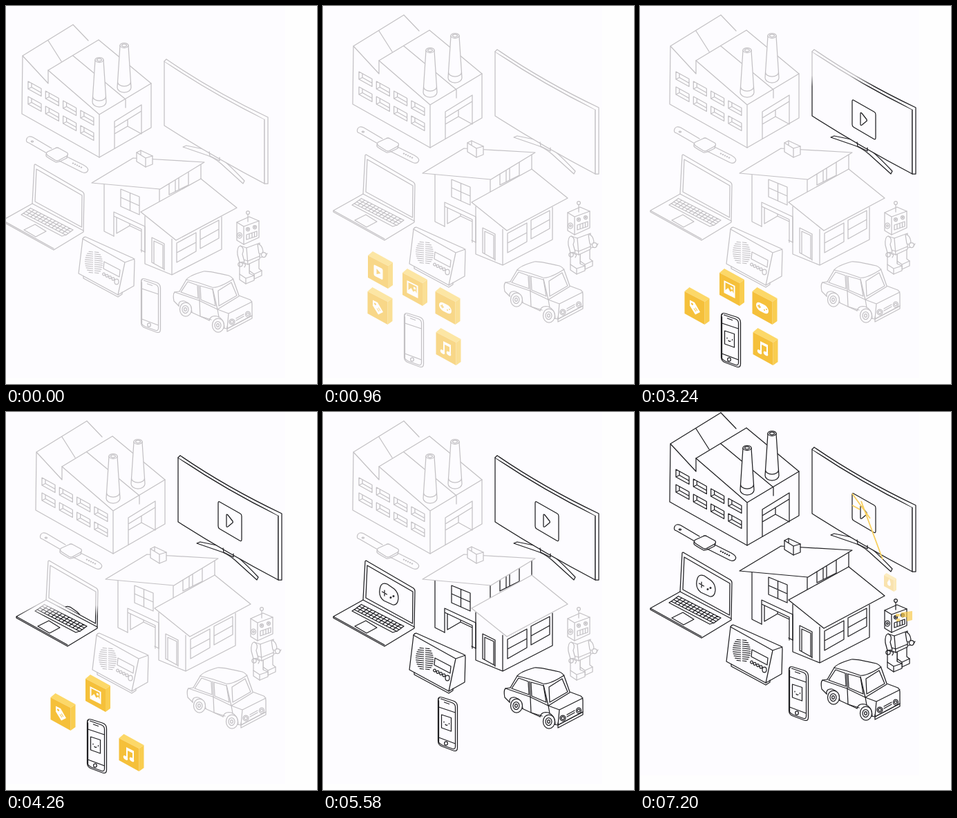
Animation of 450x547 px, one loop 7.26 s. Source, as an HTML page:

```html
<!DOCTYPE html>
<html lang="en">
<head>
<meta charset="utf-8">
<title>Connected things</title>
<style>
html, body { margin: 0; width: 100%; height: 100%; overflow: hidden; background: #fefefe; }
svg { display: block; width: 450px; height: 547px; }
.thing { fill: none; stroke-width: 1.25; stroke-linejoin: round; stroke-linecap: round; }
.solid { fill: #fdfcff; }
</style>
</head>
<body>
<svg id="stage" viewBox="0 0 450 547"></svg>
<script>
const NS = 'http://www.w3.org/2000/svg';
const LOOP = 7260, STEP = 60;
const GRAY = '#c3c1c4', DARK = '#1f1f22';
const stage = document.getElementById('stage');

function el(tag, attrs, parent) {
  const node = document.createElementNS(NS, tag);
  for (const key in attrs) node.setAttribute(key, attrs[key]);
  parent.appendChild(node);
  return node;
}
const range = n => [...Array(n).keys()];
const ring = (x, y, rx, ry = rx) =>
  `M${x - rx},${y}a${rx},${ry} 0 1 0 ${2 * rx},0a${rx},${ry} 0 1 0 ${-2 * rx},0z`;
const clamp = u => Math.min(1, Math.max(0, u));
const linear = (t, a, b) => clamp((t - a) / (b - a));
const ease = (t, a, b) => { const u = linear(t, a, b); return u * u * (3 - 2 * u); };
const move = (node, x, y, s = 1) => node.setAttribute('transform', `translate(${x},${y}) scale(${s})`);

const defs = el('defs', {}, stage);
const panel = el('rect', { y: -20, width: 404, height: 558, class: 'solid' }, stage);
const scene = el('g', {}, stage);
const wipes = [];

// A line drawing whose colour turns dark from bottom to top.
// Paths that start with "#" hide what lies behind them.
function thing(id, [bottom, top], [from, to], paths, parent = scene) {
  const grad = el('linearGradient', { id: 'ink-' + id, gradientUnits: 'userSpaceOnUse', x1: 0, x2: 0 }, defs);
  el('stop', { offset: 0, 'stop-color': GRAY }, grad);
  el('stop', { offset: 1, 'stop-color': DARK }, grad);
  const g = el('g', { class: 'thing', stroke: `url(#ink-${id})` }, parent);
  for (const p of paths) {
    const solid = p[0] === '#';
    el('path', { d: solid ? p.slice(1) : p, class: solid ? 'solid' : '' }, g);
  }
  wipes.push({ grad, bottom, top, from, to });
  return g;
}

function clip(id, d) {
  el('path', { d }, el('clipPath', { id }, defs));
}

// Factory
const factoryWindow = (x, y) =>
  `M${x},${y}l19,10.5v11l-19,-10.5zm5,3v5.5l14,8m-14,-8l-5,2.5`;
const chimney = (x, y) => [
  `#M${x - 6},${y}L${x - 10},${y + 61}a10,7 0 0 0 20,0L${x + 6},${y}z`,
  `M${x - 9.5},${y + 53}a9.5,6 0 0 0 19,0`,
  '#' + ring(x, y, 6, 3.5), ring(x, y, 3.5, 1.8)
];
thing('factory', [206, 8], [5760, 6400], [
  'M44,58L117,13L139,36M81,36L100,66M44,58L81,98V79L154,35L230,98V162L155,205L43,142L44,58',
  'M81,79L155,143V205M155,143L230,98M117,58L193,121V133',
  'M177,192V153L216,129V171M177,162L216,138M177,171L196,160L216,171M196,151V160',
  range(8).map(i => factoryWindow(52 + 25.3 * (i % 4), 95 + 14 * (i % 4) + 22 * (i >> 2))).join(''),
  ...chimney(191, 43), ...chimney(155, 64)
]);

// Television
thing('tv', [245, 60], [2640, 3480], [
  '#M276,190L281,188L315,195Q331,203 365,239L363,243L331,214Q319,204 308,201z',
  '#M249,66Q316,111.500 394,150V243Q318,203 249,159z',
  '#M249,66L252,63Q319,109 399,147V243H394V150',
  'M314,197L315,203L329,210V205'
]);
const playIcon = thing('play', [240, 60], [2640, 3000], [
  'M309,130L339,147Q341,148 341,151V184Q341,188 338,186L309,169Q307,168 307,165V132Q307,129 309,130z',
  'M319,149Q319,147 321,149L328,158Q329,160 327,161L321,166Q319,167 319,165z'
]);

// Watch
thing('watch', [228, 172], [5640, 6080], [
  'M86,192L59,176Q52,173 50,178T53,184L79,199M108,204L132,216Q141,221 138,225T129,226L97,210',
  '#M80,197L91,192Q94,190 97,192L108,198Q111,200 108,203L97,209Q94,211 91,209L80,202Q77,199 80,197z',
  'M78,200V203Q79,205 92,212Q95,213 108,206L109,202',
  ring(58, 182, 1.6, 1),
  range(5).map(i => ring(117 + 3 * i, 213.5 + 1.5 * i, .7, .5)).join('')
]);

// Laptop
const keyboard = range(4).map(i => {
  const x = 55.5 - 3.4 * i, y = 278.5 + 2.5 * i;
  return `M${x},${y}l61.5,31.5`;
}).join('') + range(13).map(i => {
  const x = 55.5 + 5.12 * i, y = 278.5 + 2.62 * i;
  return `M${x},${y}l-10.2,7.5`;
}).join('') + 'M45,286L42,288L101,319L107,317';
thing('laptop', [340, 214], [3900, 4740], [
  'M58,272L61,216Q62,214 64,216L131,255Q133,257 133,259L132,311z',
  'M64,222L130,260L129.5,306L62,269z',
  'M58,272L15,296V298L89,339L132,313V311M15,296L89,337',
  keyboard,
  'M62,302L78,312L63,320L46,310z'
]);
clip('laptop-screen', 'M64,222L130,260L129.5,306L62,269z');
const padIcon = thing('pad', [340, 214], [3900, 4100], [
  'M83,253Q85,246 93,249L103,256Q109,261 109,270Q108,280 101,279L88,273Q79,266 83,253z',
  'M89,258V266M85.5,260L92.5,264', ring(98, 268.5, .9), ring(102, 266.5, .9)
], el('g', { 'clip-path': 'url(#laptop-screen)' }, scene));

// House
thing('house', [376, 214], [4760, 5580], [
  'M162,244V312L176,319M221,342L215,339M242,251V269M302,215V238',
  'M176,319V284L221,305V342M176,290L216,309V342M180,292V315L199,304L216,312M199,301V304',
  'M186,251L213,262V288L186,276zM199.5,257V282M186,263L213,275',
  'M256,243V259L284,245V226M265,238V254M270,235V252',
  'M221,290V359L260,375L332,338V291M260,323V375',
  'M231,357V321L249,330V368M234,358V326L247,332V365M231,357L249,367',
  'M267,329L295,314V341L267,357zM267,343L295,328M301,310L328,296V322L301,337zM301,324L328,309'
]);
thing('roof', [326, 194], [5590, 5960], [
  '#M144,242L204,206L307,212L243,251z',
  '#M209,198L215,195L232,203V215L222,219L209,211z',
  'M209,198L222,206V219M222,206L232,203M215,195V201',
  '#M215,284L302,236L354,278L266,325z'
]);

// Radio
const slots = range(11).map(i => {
  const w = 12.5 * Math.sqrt(1 - ((i - 5) / 6) ** 2), y = 342 + 3 * i;
  return `M${147 - w},${y - w * .1}L145.5,${y}M148.5,${y}L${147 + w},${y + w * .1}`;
}).join('');
thing('radio', [408, 318], [4380, 4860], [
  '#M131,323Q132,320 135,320L204,351Q206,352 206,355L205,391L182,404L125,373z',
  'M131,323L192,357L182,404M192,357L206,352', 'M132,377V380L182,407L188,403V400',
  slots, 'M162,356L185,368L184,378L161,366z',
  range(4).map(i => ring(161.5 + 4.5 * i, 374 + 2.3 * i, 1.8, 2)).join(''), ring(180, 385, 3, 3.8)
]);

// Car
const wheel = (x, y) => ['#' + ring(x, y, 8.5, 10), ring(x - .5, y, 4.5, 5.5), ring(x - .5, y, 1.8, 2.4)];
thing('car', [461, 368], [4980, 5520], [
  'M271,399L281,382Q285,376 306,370Q312,369 342,376Q348,378 350,385L357,405L373,411Q376,413 376,418L376,434L340,453L334,452',
  'M271,399L264,400Q261,403 263,413L270,420M288,429L314,441',
  'M281,382Q300,386 318,393Q327,395 349,381',
  'M264,400L299,412L326,425L357,406M326,425L342,431L376,414M342,431L340,453',
  'M283,385L297,390L298,409L273,400zM301,391L319,396L323,420L302,411z',
  'M327,398L346,386L354,405L328,420zM299,390L301,435L317,440M319,395L326,425L328,436',
  'M270,420Q269,412 278,413Q288,416 289,429M314,441Q316,433 326,435Q336,439 336,452',
  ...wheel(280, 425), ...wheel(327, 448),
  ring(347, 443, 4), ring(347, 443, 2.2), ring(370, 432, 3.5, 4), ring(370, 432, 1.8),
  'M353,438L364,432M353,441L364,435M340,450V457L376,438V434M340,453L376,434'
]);

// Robot
thing('robot', [390, 281], [6700, 7060], [
  '#M372,358V376L379,381L390,376V369L386,366V350z', 'M379,374V381M372,369L379,374L390,369',
  '#M358,356V382L367,388L379,383V376L372,373V358z', 'M367,380V388M358,374L367,380L379,376',
  '#M359,333L368,336L387,329V352L370,360L361,356z', 'M368,336L370,360M361,352L370,355L387,348',
  '#M359,333Q354,334 355,346L358,357L365,356L362,345Q366,336 359,333z',
  ring(359, 360, 3.2), 'M362,358L367,360L365,364',
  '#M384,331Q390,330 392,341L390,345L386,344z',
  '#' + ring(393, 346, 3.5), 'M391,349L388,350M396,347L398,344',
  '#M354,299L372,291L386,297V321L364,331L354,325z', 'M354,299L364,305L386,297M364,305V331',
  'M370,298V288', '#' + ring(370, 285, 2.4),
  '#' + ring(358, 318, 3.4, 4), ring(358, 318, 1.4),
  ring(370, 309, 2.5), ring(380, 306, 2.5), ring(370, 309, .8), ring(380, 306, .8),
  'M368,317L383,312V319L368,324zM372,316V322M376,314V321M379.5,313V320'
]);

// Phone
const phone = el('g', {}, scene);
thing('phone', [524, 444], [1740, 2280], [
  '#M118,449Q118,443 124,445L140,450Q146,452 146,458V518Q146,524 140,522L124,516Q118,514 118,508z',
  'M120,446Q117,447 119,450V510Q120,512 124,514L138,519Q143,521 143,516V459Q143,455 139,453L122,447',
  'M119,459L143,467M119,503L143,512', ring(129.5, 511.5, 2.3, 2.6), 'M127,452L134,454.5'
], phone);
clip('phone-screen', 'M119,459L143,467V512L119,503z');
const faceIcon = thing('face', [524, 444], [1740, 1860], [
  'M123,470L137,474.5V494L123,489z',
  'M126.5,480V481M134,482.5V483.5M128.5,484Q130,486 131.5,485'
], el('g', { 'clip-path': 'url(#phone-screen)' }, phone));

// Yellow cubes
const glyphs = {
  play: g => {
    el('rect', { x: -6, y: -8, width: 13, height: 16, rx: 2 }, g);
    el('path', { d: 'M-2,-4L4,0L-2,4z', fill: '#f5c03a' }, g);
  },
  image: g => {
    el('path', { d: 'M-8,-9H8V9H-8zM-6,-7V4L-2,-1L1,3L4,0L6,3V-7z', 'fill-rule': 'evenodd' }, g);
    el('circle', { cx: 3, cy: -3, r: 1.7 }, g);
  },
  game: g => {
    el('rect', { x: -9, y: -6, width: 18, height: 12, rx: 6 }, g);
    el('path', { d: 'M-7,0H-2M-4.5,-2.5V2.5M2,1.5H4M5,-1H7', stroke: '#f5c03a', 'stroke-width': 1.5 }, g);
  },
  tag: g => {
    el('path', { d: 'M-7,-8L0,-8L8,2L1,9L-7,0z' }, g);
    el('circle', { cx: -3.5, cy: -4, r: 1.5, fill: '#f5c03a' }, g);
    el('path', { d: 'M-1,1L2,4M1,-1L4,2', stroke: '#f5c03a' }, g);
  },
  music: g => {
    el('path', { d: 'M-4,-9L7,-9V5H5V-5H-2V8H-4z' }, g);
    el('ellipse', { cx: -5, cy: 7, rx: 3.3, ry: 2.8 }, g);
    el('ellipse', { cx: 4, cy: 5, rx: 3.3, ry: 2.8 }, g);
  },
  flame: g => el('path', { d: 'M0,-14Q5,-7 5,0Q5,7 0,7Q-5,7 -5,0Q-4,-3 -2,-6Q0,-9 0,-14z' }, g)
};
function cube(kind) {
  const g = el('g', {}, scene);
  el('path', { d: 'M0,6L7,0L36,16L29,21z', fill: '#fcd868' }, g);
  el('path', { d: 'M29,21L36,16V49L29,54z', fill: '#f9cd50' }, g);
  el('path', { d: 'M0,6L29,21V54L0,38z', fill: '#f5c03a' }, g);
  glyphs[kind](el('g', { transform: 'translate(14.5,30) skewY(27)', fill: '#fff' }, g));
  return g;
}
const cubes = [
  ['play', 65, 355, 2460], ['image', 115, 380, 4860], ['game', 162.5, 407, 3480],
  ['tag', 64.5, 407, 5040], ['music', 163.5, 466, 4440]
].map(([kind, x, y, leave]) => {
  const node = cube(kind);
  move(node, x, y);
  return { node, leave };
});

// Flying cube and its trail
const trail = el('path', {
  d: 'M307,130L333,166M307,147L318,153M320,141L351,225',
  fill: 'none', stroke: '#f8cf5e', 'stroke-width': 1.8
}, scene);
const ghost = cube('flame');
move(ghost, 353, 245, .5);
const glow = el('path', {
  d: 'M370,304h6v4h-6zM378,302l16,-2v13l-8,2v-6h-8zM371,311h5v4h-5z', fill: '#f8cb4c'
}, scene);
const flyer = cube('flame');
const stops = [[211, 120], [306, 132], [345, 232], [371, 292]];
function flight(u) {
  const s = u * (stops.length - 1), i = Math.min(stops.length - 2, Math.floor(s)), f = s - i;
  return [0, 1].map(k => stops[i][k] + f * (stops[i + 1][k] - stops[i][k]));
}

const fade = (node, a) => node.setAttribute('opacity', a);

function draw(t) {
  const intro = ease(t, 180, 900);
  const lift = -12 * ease(t, 6420, 6630);
  move(scene, -20 * (1 - intro), 14 * (1 - intro) + lift);
  move(panel, 0, lift);

  for (const w of wipes) {
    const y = w.bottom + 10 + (w.top - w.bottom - 20) * linear(t, w.from, w.to);
    w.grad.setAttribute('y1', y - 8);
    w.grad.setAttribute('y2', y + 8);
  }

  const home = 1 - intro + ease(t, 5220, 5940);
  move(phone, 98 * home - .5, -64 * home);

  move(faceIcon, 0, 40 * (1 - ease(t, 1860, 2280)));
  fade(faceIcon, t >= 1860 ? 1 : 0);
  move(playIcon, 0, 40 * (1 - ease(t, 2880, 3360)));
  fade(playIcon, linear(t, 2820, 3060));
  move(padIcon, 0, 45 * (1 - ease(t, 4140, 4500)));
  fade(padIcon, t >= 4140 ? 1 : 0);

  for (const c of cubes) fade(c.node, linear(t, 600, 1200) * (1 - ease(t, c.leave, c.leave + 360)));

  const u = ease(t, 6560, 7140);
  const [x, y] = flight(u);
  move(flyer, x, y, 1 - .5 * u);
  fade(flyer, .65 * linear(t, 6300, 6540) * (1 - linear(t, 6900, 7140)));
  fade(trail, linear(t, 6780, 6900));
  fade(ghost, .4 * linear(t, 6900, 7020));
  fade(glow, .7 * linear(t, 7020, 7140));
}

function tick() {
  const t = performance.now() % LOOP;
  draw(Math.floor(t / STEP) * STEP);
  requestAnimationFrame(tick);
}
tick();
</script>
</body>
</html>
```
